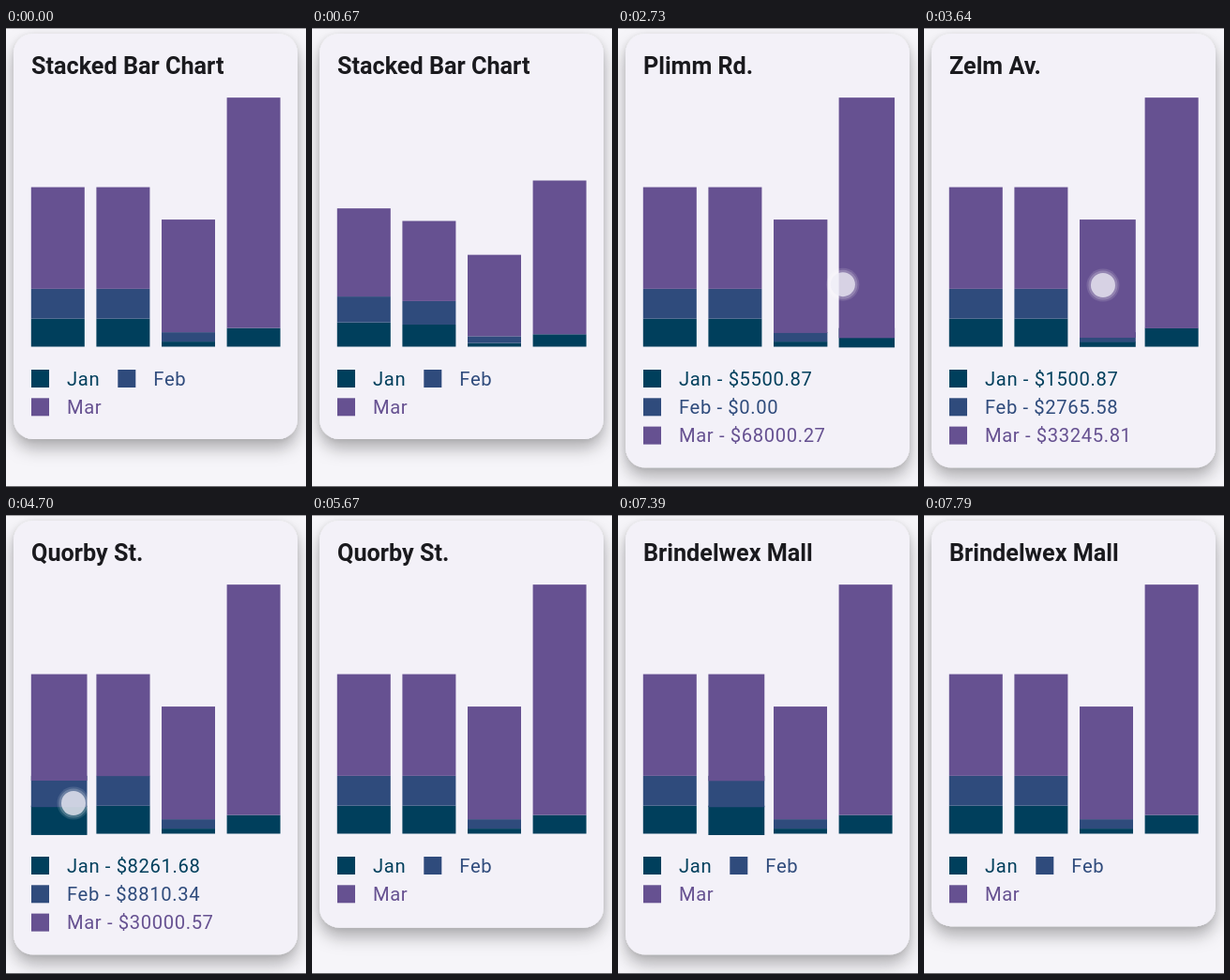
An HTML page for the animation above (7.82 s loop, 320x489 px).

```html
<!DOCTYPE html>
<html lang="en">
<head>
<meta charset="utf-8">
<title>Stacked Bar Chart</title>
<style>
html, body { margin: 0; width: 100%; height: 100%; overflow: hidden; background: #f6f5f9; }
svg { display: block; width: 320px; height: 489px; }
text { font-family: Roboto, "Open Sans", sans-serif; white-space: pre; }
#title { font-size: 25.2px; font-weight: 700; fill: #1a1a1e; }
#legend text { font-size: 20.2px; letter-spacing: .63px; }
</style>
</head>
<body>
<svg viewBox="0 0 320 489">
  <defs>
    <filter id="shadow" filterUnits="userSpaceOnUse" x="-40" y="-40" width="400" height="580">
      <feDropShadow dx="0" dy="10" stdDeviation="9" flood-color="#000" flood-opacity=".27"/>
      <feDropShadow dx="0" dy="1" stdDeviation="3" flood-color="#000" flood-opacity=".1"/>
    </filter>
    <clipPath id="clip"><rect id="clipRect" x="8" y="350" width="303" height="70"/></clipPath>
  </defs>
  <rect width="320" height="489" fill="#f6f5f9"/>
  <rect id="card" x="8" y="6" width="303" height="432" rx="21" fill="#f3f1f8" filter="url(#shadow)"/>
  <rect width="320" height="1" fill="#a3a2a6"/>
  <rect y="488" width="320" height="1" fill="#69686c"/>
  <text id="title" x="27" y="49.4"></text>
  <g id="bars"></g>
  <g id="legend" clip-path="url(#clip)"></g>
  <g id="pointer">
    <circle r="17.5" fill="#fff" opacity=".12"/>
    <circle r="15.5" fill="#fff" opacity=".2"/>
    <circle r="13" fill="#eeecf5" opacity=".75"/>
  </g>
</svg>
<script>
const LOOP = 7820, BASE = 339.5, BAR_WIDTH = 57, DOLLARS_PER_PX = 277;
const series = [
  { name: "Jan", color: "#003f5c", x: 27, row: 0 },
  { name: "Feb", color: "#2f4b7c", x: 119.3, row: 0 },
  { name: "Mar", color: "#665191", x: 27, row: 1 }
];
const places = [
  { name: "Quorby St.", values: [8261.68, 8810.34, 30000.57] },
  { name: "Brindelwex Mall", values: [8261.68, 8810.34, 30000.57] },
  { name: "Zelm Av.", values: [1500.87, 2765.58, 33245.81] },
  { name: "Plimm Rd.", values: [5500.87, 0, 68000.27] }
];
// [time, selected bar]; -1 clears the selection
const selections = [[1670, 1], [1980, 2], [2640, 3], [3495, 2], [4240, 1],
  [4580, 0], [5420, -1], [6220, 1], [7390, -1]];
// [time, direction] of legend height changes
const resizes = [[1788, 1], [5440, 0], [6300, 1], [7410, 0]];
// Each touch: [time, x, y]
const touches = [
  [[1480, 148, 289], [1670, 148, 289], [1910, 162, 293], [2450, 215, 282], [2800, 246, 271],
    [3120, 252, 268], [3450, 252, 268], [3640, 191, 274], [4240, 165.9, 290], [4700, 72, 307], [5150, 72, 307]],
  [[6090, 135, 296], [7390, 135, 296]]
];

const byId = id => document.getElementById(id);
function add(parent, tag, attrs) {
  const el = document.createElementNS("http://www.w3.org/2000/svg", tag);
  set(el, attrs);
  parent.appendChild(el);
  return el;
}
function set(el, attrs) {
  for (const key in attrs) el.setAttribute(key, attrs[key]);
}
function label(el, text) {
  if (el.textContent !== text) el.textContent = text;
}

const bars = places.map(() => series.map(s => add(byId("bars"), "rect", { fill: s.color })));
const legend = series.map(s => ({
  box: add(byId("legend"), "rect", { width: 19, height: 19, fill: s.color }),
  text: add(byId("legend"), "text", { fill: s.color })
}));

// Critically damped spring, from 0 to 1
function spring(ms, frequency) {
  const x = Math.max(0, ms) / 1000 * frequency;
  return 1 - (1 + x) * Math.exp(-x);
}

function lift(index, t) {
  let amount = 0, previous = -1;
  for (const [start, bar] of selections) {
    if (t < start) break;
    if (bar === index) amount = spring(t - start, 39);
    else if (previous === index) amount = 1 - spring(t - start, 39);
    else amount = 0;
    previous = bar;
  }
  return amount;
}

function drawBars(t) {
  places.forEach((place, i) => {
    const grow = t < 30 ? 1 : Math.min(1, t / (774 + 77.3 * i));
    const scale = 1 + .05 * lift(i, t);
    let top = BASE;
    place.values.forEach((value, j) => {
      const height = value / DOLLARS_PER_PX * grow;
      top -= height;
      set(bars[i][j], { x: 26.8 + 69.6 * i, y: top, width: BAR_WIDTH * scale, height: height * scale });
    });
  });
}

function drawLegend(place) {
  series.forEach((s, j) => {
    const x = place ? 27 : s.x;
    const y = 364 + 30.3 * (place ? j : s.row);
    set(legend[j].box, { x, y });
    set(legend[j].text, { x: x + 38, y: y + 16.7 });
    label(legend[j].text, place ? `${s.name} - $${place.values[j].toFixed(2)}` : s.name);
  });
}

function drawCard(t) {
  let open = 0;
  for (const [start, target] of resizes) {
    if (t >= start) open = target ? spring(t - start, 20) : 1 - spring(t - start, 20);
  }
  const bottom = 438 + 30.3 * open;
  set(byId("card"), { height: bottom - 6 });
  set(byId("clipRect"), { height: bottom - 18 - 350 });
}

function drawPointer(t) {
  const path = touches.find(p => t >= p[0][0] && t < p[p.length - 1][0]);
  byId("pointer").style.display = path ? "" : "none";
  if (!path) return;
  const next = path.findIndex(p => p[0] > t);
  const [t0, x0, y0] = path[next - 1], [t1, x1, y1] = path[next];
  const k = (t - t0) / (t1 - t0);
  set(byId("pointer"), { transform: `translate(${x0 + (x1 - x0) * k} ${y0 + (y1 - y0) * k})` });
}

function draw(t) {
  const past = selections.filter(s => s[0] <= t).map(s => s[1]);
  const selected = past.length ? past[past.length - 1] : -1;
  const named = past.filter(bar => bar >= 0).pop();
  label(byId("title"), named === undefined ? "Stacked Bar Chart" : places[named].name);
  drawBars(t);
  drawLegend(places[selected]);
  drawCard(t);
  drawPointer(t);
}

const begin = performance.now();
function frame() {
  draw((performance.now() - begin) % LOOP);
  requestAnimationFrame(frame);
}
draw(0);
requestAnimationFrame(frame);
</script>
</body>
</html>
```
